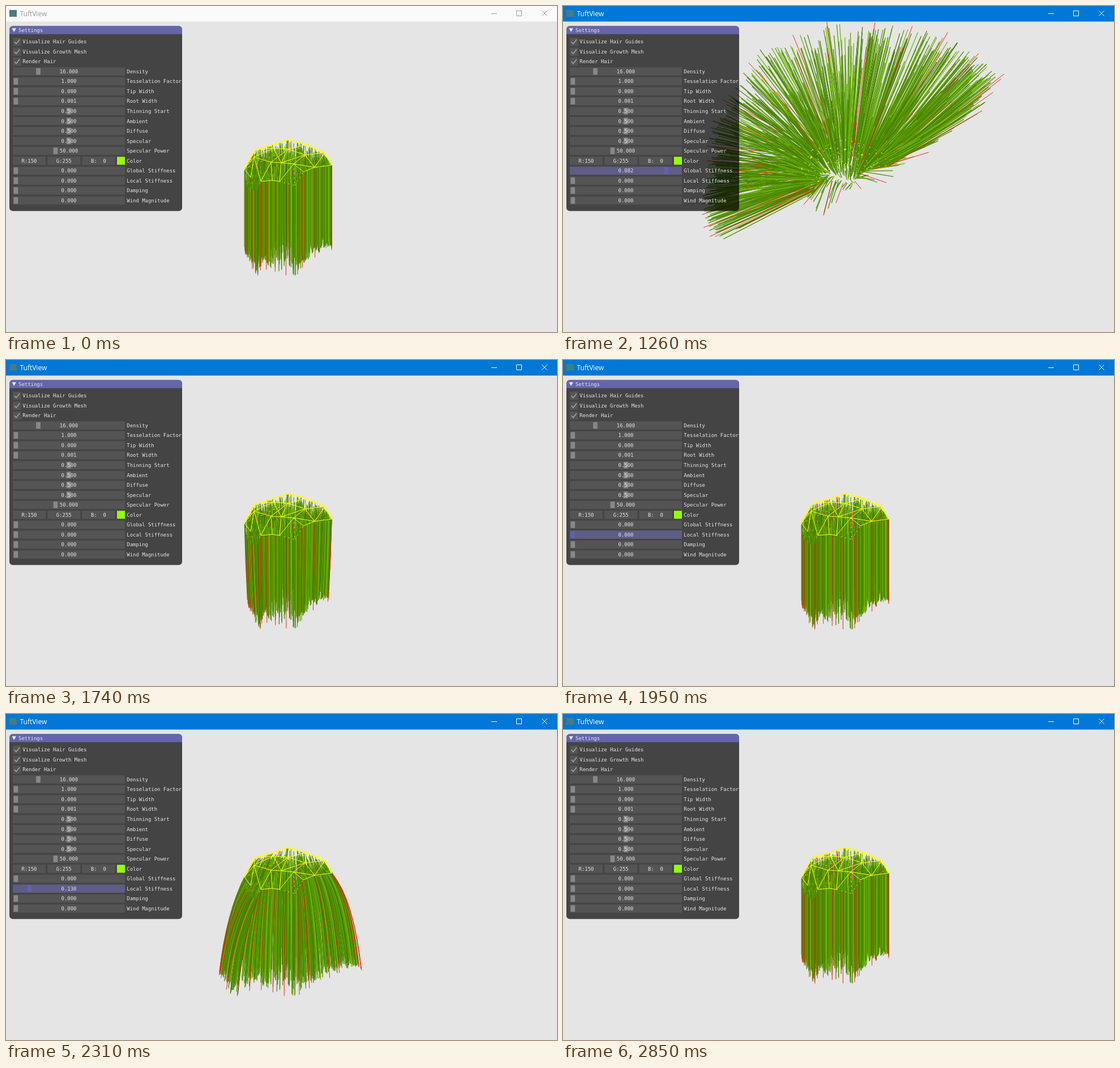
Animation of 973 by 576 pixels, one loop 2880 ms. Source, as an HTML page with a canvas:

```html
<!DOCTYPE html>
<html lang="en">
<head>
<meta charset="utf-8">
<title>TuftView</title>
<style>
  html, body { margin: 0; width: 100%; height: 100%; overflow: hidden; background: #e5e5e5; }
  canvas, svg { position: absolute; left: 0; top: 0; display: block; }
  .ui { font: 8.95px "DejaVu Sans Mono", monospace; fill: #e6e6e6; white-space: pre; }
  .caption { font: 12px "Open Sans", sans-serif; }
</style>
</head>
<body>
<canvas id="hair" width="973" height="576"></canvas>
<svg id="ui" width="973" height="576" viewBox="0 0 973 576"></svg>
<script>
const LOOP = 2880, STEP = 30;
const ctx = document.getElementById('hair').getContext('2d');
const svg = document.getElementById('ui');
const mix = (a, b, k) => a + (b - a) * k;
const mixPoint = (a, b, k) => [mix(a[0], b[0], k), mix(a[1], b[1], k)];

// ---- interface ----
function add(tag, attrs, text) {
  const el = document.createElementNS('http://www.w3.org/2000/svg', tag);
  for (const name in attrs) el.setAttribute(name, attrs[name]);
  if (text !== undefined) el.textContent = text;
  return svg.appendChild(el);
}
const rect = (x, y, width, height, fill, rx = 0) => add('rect', { x, y, width, height, fill, rx });
const label = (x, y, text, anchor = 'start') =>
  add('text', { x, y: y + 3.2, class: 'ui', 'text-anchor': anchor }, text);

const FRAME = 'rgba(110,110,110,.39)', FRAME_ACTIVE = 'rgba(107,105,163,.69)';
const GRAB = 'rgba(255,255,255,.3)', GRAB_ACTIVE = 'rgba(105,99,204,.6)';
const ROW = 17.54, FIRST_ROW = 115.6;

const bar = rect(0, 0, 973, 27.5, '#fafafa');
rect(6, 7, 13, 12, '#467c83');
const caption = add('text', { x: 24.5, y: 17.5, class: 'caption' }, 'TuftView');
const buttons = add('path', {
  d: 'M857 13.5H867M901.5 8.5h9v9h-9zM946.5 8.5l9 9M955.5 8.5l-9 9', fill: 'none'
});

rect(6, 35.3, 305, 327, 'rgba(0,0,0,.7)', 6);
add('path', { d: 'M6 49.7V41.3q0-6 6-6H305q6 0 6 6V49.7Z', fill: 'rgba(128,128,255,.55)' });
add('path', { d: 'M10.5 39.3H18L14.2 46Z', fill: '#e6e6e6' });
label(22, 42.7, 'Settings');

['Visualize Hair Guides', 'Visualize Growth Mesh', 'Render Hair'].forEach((text, i) => {
  const y = 63.2 + i * ROW;
  rect(12, y - 7.3, 14.6, 14.6, FRAME);
  add('path', { d: `M14.8 ${y}l3.2 3.5L24 ${y - 4}`, fill: 'none', stroke: '#a0a0a0', 'stroke-width': 1.7 });
  label(29.3, y, text);
});

function slider(row, name, value, part) {
  const y = FIRST_ROW + row * ROW;
  const frame = rect(12, y - 7.3, 198, 14.6, FRAME);
  const grab = rect(0, y - 5.8, 7.7, 11.6, GRAB);
  const number = label(111, y, value.toFixed(3), 'middle');
  label(213.3, y, name);
  const set = (k, active) => {
    grab.setAttribute('x', 13.5 + k * 187);
    grab.setAttribute('fill', active ? GRAB_ACTIVE : GRAB);
    frame.setAttribute('fill', active ? FRAME_ACTIVE : FRAME);
  };
  set(part, false);
  return (k, active) => { set(k, active); number.textContent = k.toFixed(3); };
}
slider(0, 'Density', 16, .212);
slider(1, 'Tesselation Factor', 1, 0);
slider(2, 'Tip Width', 0, 0);
slider(3, 'Root Width', .001, 0);
['Thinning Start', 'Ambient', 'Diffuse', 'Specular'].forEach((name, i) => slider(4 + i, name, .5, .5));
slider(8, 'Specular Power', 50, .375);
const colorY = FIRST_ROW + 9 * ROW;
['R:150', 'G:255', 'B:\u00a0\u00a00'].forEach((text, i) => {
  rect(12 + i * 61.2, colorY - 7.3, 58.2, 14.6, FRAME);
  label(41 + i * 61.2, colorY, text, 'middle');
});
rect(196, colorY - 7, 14, 14, '#96ff00');
label(213.3, colorY, 'Color');
const setGlobal = slider(10, 'Global Stiffness', 0, 0);
const setLocal = slider(11, 'Local Stiffness', 0, 0);
slider(12, 'Damping', 0, 0);
slider(13, 'Wind Magnitude', 0, 0);

// ---- hair: u runs left to right over the scalp, v front to back ----
const backRoot = [[421, 288], [440, 254], [468, 246], [498, 236], [530, 245], [563, 259], [575, 281]];
const frontRoot = [[424, 318], [442, 330], [451, 310], [470, 308], [510, 317], [525, 293], [575, 283]];
const backStiff = [[245, 350], [258, 200], [345, 75], [465, 28], [585, 30], [690, 48], [779, 120]];
const frontStiff = [[246, 388], [268, 420], [400, 330], [454, 376], [500, 330], [580, 310], [740, 185]];
const frontHang = [440, 481, 464, 468, 481, 460, 422];

function along(points, u) {
  const s = u * (points.length - 1), i = Math.min(Math.floor(s), points.length - 2);
  return mixPoint(points[i], points[i + 1], s - i);
}
const hangPoints = frontHang.map((y, i) => [frontRoot[i][0], y]);

let seed = 7;
const random = () => (seed = seed * 16807 % 2147483647) / 2147483647;

function strand(u, v, reach, color, width) {
  const root = mixPoint(along(frontRoot, u), along(backRoot, u), v);
  const stiff = mixPoint(along(frontStiff, u), along(backStiff, u), Math.sin(v * Math.PI / 2));
  const hang = [root[0], mix(along(hangPoints, u)[1], along(backRoot, u)[1] + 150, v)];
  return { root, stiff, hang, v, reach, color, width };
}
const greens = ['#447b00', '#4b8500', '#508c00', '#5a9c00', '#6bb50a'];
const strands = [];
for (let i = 0; i < 1000; i++) {
  strands.push(strand((i % 50 + random()) / 50, random(), .88 + .11 * random(),
    greens[Math.floor(random() * greens.length)], 1.25));
}
for (let i = 0; i < 44; i++) {
  const u = Math.min(1, (i % 11 + .25 * random()) / 10);
  strands.push(strand(u, Math.floor(i / 11) / 3, 1, '#f51400', .9));
}
strands.sort((a, b) => b.v - a.v);

function drawStrand(s, [cx, cy, tx, ty, sag]) {
  const [x, y] = s.root, [sx, sy] = s.stiff, [hx, hy] = s.hang;
  const bendX = mix(hx - x, sx - x, cx) / 2, bendY = mix(hy - y, sy - y, cy) / 2;
  const tipX = mix(hx, sx, tx) - x, tipY = mix(hy, sy, ty) + sag - y;
  ctx.beginPath();
  ctx.moveTo(x, y);
  ctx.quadraticCurveTo(x + bendX * s.reach, y + bendY * s.reach, x + tipX * s.reach, y + tipY * s.reach);
  ctx.strokeStyle = s.color;
  ctx.lineWidth = s.width;
  ctx.stroke();
}

// ---- growth mesh: lettered vertices, edges as letter pairs ----
const vertices = [
  ...backRoot, [438, 267], [498, 253], [528, 263], [468, 276], [486, 277], [508, 279], [545, 285],
  [432, 303], [450, 310], [470, 308], [483, 310], [510, 317], [525, 293], [472, 251]
];
const rim = 'ab bc cd de ef fg';
const inner = 'ah hb ho hp hk hu ki ui li lm mj ij jl ie je jf jn mn ng fn kl kq lr mr mt tn qr pq pk ao ul bu';
const hidden = 'rs ms st dn ai';
function drawEdges(edges, width, dash) {
  ctx.beginPath();
  for (const edge of edges.split(' ')) {
    const [a, b] = [...edge].map(letter => vertices[letter.charCodeAt(0) - 97]);
    ctx.moveTo(...a);
    ctx.lineTo(...b);
  }
  ctx.setLineDash(dash);
  ctx.strokeStyle = '#ffff00';
  ctx.lineWidth = width;
  ctx.stroke();
  ctx.setLineDash([]);
}

// ---- motion: [time, values...] ----
const poses = [
  [1020, 0, 0, 0, 0, 0],
  [1090, .3, .2, .2, .1, 15],
  [1200, 1, 1, 1, 1, 0],
  [1300, 1, 1, 1, 1, 0],
  [1380, .75, .9, .75, .5, 40],
  [1440, .25, .2, .4, .1, 25],
  [1530, -.2, -.1, -.21, .17, 0],
  [1620, .06, .04, .08, 0, 0],
  [1700, -.03, 0, -.05, .02, 0],
  [1800, 0, 0, 0, 0, 0],
  [1950, 0, 0, 0, 0, 0],
  [2070, 1, 1.6, .93, .6, 130],
  [2130, 1, 1.6, .92, .6, 128],
  [2220, .7, .9, .6, .25, 80],
  [2310, .38, .2, .26, 0, 22],
  [2430, -.15, -.05, -.15, .08, 0],
  [2520, .04, .02, .05, 0, 0],
  [2610, 0, 0, 0, 0, 0]
];
const globalKeys = [[1020, 0], [1200, .882], [1290, .882], [1410, 0]];
const localKeys = [[1950, 0], [2070, .9], [2160, .9], [2310, .13], [2350, 0]];

function track(keys, t) {
  const next = keys.findIndex(key => key[0] > t);
  if (next === 0) return keys[0].slice(1);
  if (next < 0) return keys[keys.length - 1].slice(1);
  const a = keys[next - 1], b = keys[next], k = (t - a[0]) / (b[0] - a[0]);
  return a.slice(1).map((value, i) => mix(value, b[i + 1], k * k * (3 - 2 * k)));
}

function render(t) {
  const active = t >= 1020;
  bar.setAttribute('fill', active ? '#0078d7' : '#fafafa');
  caption.setAttribute('fill', active ? '#fff' : '#999');
  buttons.setAttribute('stroke', active ? '#fff' : '#999');
  setGlobal(track(globalKeys, t)[0], active && t < 1680);
  setLocal(track(localKeys, t)[0], t >= 1800 && t < 2580);

  const pose = track(poses, t), lift = Math.max(0, Math.min(1, pose[3]));
  ctx.clearRect(0, 0, 973, 576);
  for (const s of strands) drawStrand(s, pose);
  const dash = lift > .25 ? [mix(12, 2, lift), mix(1, 10, lift)] : [];
  drawEdges(rim, mix(2, .9, lift), dash);
  drawEdges(inner, 1, dash);
  drawEdges(hidden, .9, [2, mix(6, 12, lift)]);
}

let start, shown;
function tick(now) {
  start ??= now;
  const t = Math.floor((now - start) % LOOP / STEP) * STEP;
  if (t !== shown) render(shown = t);
  requestAnimationFrame(tick);
}
render(0);
requestAnimationFrame(tick);
</script>
</body>
</html>
```
